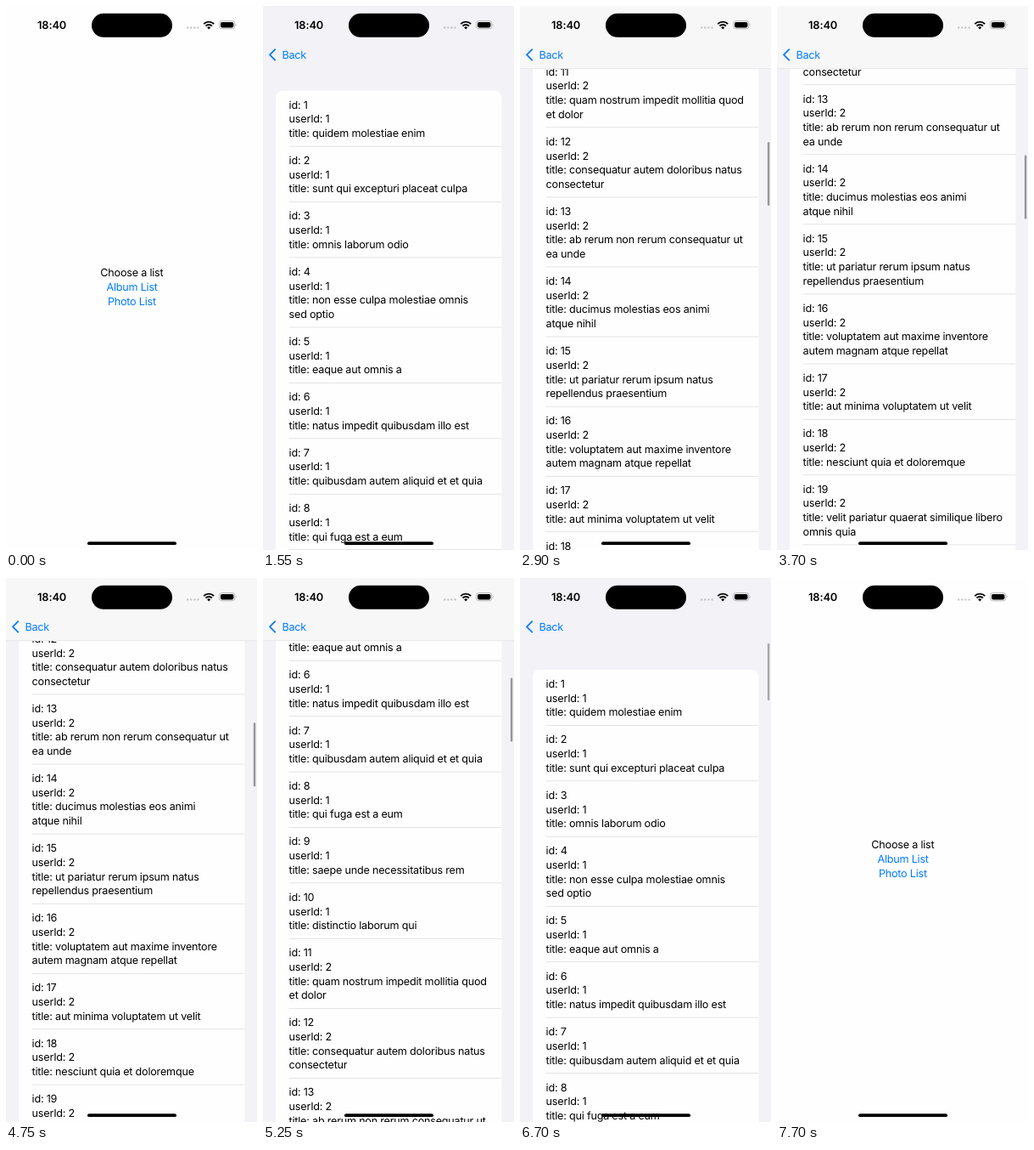
Animation, 296 px wide and 640 px high, one loop 8 s. Source, as an HTML page:

```html
<!DOCTYPE html>
<html lang="en">
<head>
<meta charset="utf-8">
<title>Album list</title>
<style>
  html, body { margin: 0; width: 100%; height: 100%; overflow: hidden; background: #fefefe; }
  svg { display: block; width: 100vw; height: 100vh; }
  text { font: 12.6px Inter, "Open Sans", sans-serif; letter-spacing: -.205px; fill: #000;
         text-rendering: geometricPrecision; white-space: pre; }
  .link { fill: #007aff; }
  .mid { text-anchor: middle; }
</style>
</head>
<body>
<svg viewBox="0 0 296 640" preserveAspectRatio="none">
  <defs>
    <linearGradient id="edge">
      <stop offset="0" stop-color="#000" stop-opacity="0"/>
      <stop offset="1" stop-color="#000" stop-opacity=".07"/>
    </linearGradient>
  </defs>
  <g id="home">
    <rect width="296" height="640" fill="#fefefe"/>
    <text class="mid" x="148.4" y="318">Choose a list</text>
    <text class="mid link" id="album" x="148.6" y="334.7">Album List</text>
    <text class="mid link" x="148.4" y="351.5">Photo List</text>
    <rect id="dim" width="296" height="640" fill="#000"/>
  </g>
  <g id="page">
    <rect x="-8" width="8" height="640" fill="url(#edge)"/>
    <rect width="296" height="640" fill="#f2f2f7"/>
    <g id="list"></g>
    <g id="header">
      <rect width="296" height="74" fill="#f7f7f8"/>
      <rect y="73.6" width="296" height=".5" fill="#d4d4d6"/>
    </g>
    <rect id="bar" x="291.9" width="2.4" rx="1.2" fill="#000" fill-opacity=".38"/>
  </g>
  <g id="back">
    <path d="M14.2 51.2 L8 57.4 L14.2 63.6" fill="none" stroke="#007aff" stroke-width="1.8"
          stroke-linecap="round" stroke-linejoin="round"/>
    <text class="link" id="backText" y="62">Back</text>
  </g>
  <g id="status">
    <text x="37" y="27" style="font-weight:600;font-size:12.8px;letter-spacing:-.1px">18:40</text>
    <rect x="101" y="8.8" width="95" height="28" rx="14"/>
    <path d="M214.2 25.4h13" stroke="#c4c4c6" stroke-width="2.4" stroke-linecap="round" stroke-dasharray="0 4.1"/>
    <g fill="none" stroke="#000" stroke-width="1.9">
      <path d="M233.2 21.1a8.4 8.4 0 0 1 12 0"/>
      <path d="M235.5 23.5a5.2 5.2 0 0 1 7.4 0"/>
    </g>
    <path d="M237.2 25.2a2.9 2.9 0 0 1 4 0l-2 2.2z"/>
    <rect x="251.6" y="17.6" width="18.2" height="9.2" rx="2.9" fill="none" stroke="#a6a6a8" stroke-width=".8"/>
    <rect x="253" y="19" width="15.4" height="6.4" rx="1.8"/>
    <path d="M270.9 20.6q1.5 1.6 0 3.2z" fill="#a6a6a8"/>
    <rect x="96" y="630.2" width="105" height="3.9" rx="1.95"/>
  </g>
</svg>
<script>
const LOOP = 8000, STEP = 50;
const ROW = 65.4, LINE = 16.7, TOP = 100, BAR = 75;
const titles = `quidem molestiae enim
sunt qui excepturi placeat culpa
omnis laborum odio
non esse culpa molestiae omnis|sed optio
eaque aut omnis a
natus impedit quibusdam illo est
quibusdam autem aliquid et et quia
qui fuga est a eum
saepe unde necessitatibus rem
distinctio laborum qui
quam nostrum impedit mollitia quod|et dolor
consequatur autem doloribus natus|consectetur
ab rerum non rerum consequatur ut|ea unde
ducimus molestias eos animi|atque nihil
ut pariatur rerum ipsum natus|repellendus praesentium
voluptatem aut maxime inventore|autem magnam atque repellat
aut minima voluptatem ut velit
nesciunt quia et doloremque
velit pariatur quaerat similique libero|omnis quia
voluptas rerum iure ut enim
repudiandae voluptatem optio est|consequatur rem in temporibus et
et rem non provident vel ut
incidunt quisquam hic adipisci sequi`.split("\n");

// [time, list offset]
const track = [
  [1500, 0], [1550, .3], [1700, 70], [1850, 190], [2050, 295], [2300, 366], [2450, 390],
  [2550, 440], [2700, 580], [2900, 710], [3150, 800], [3450, 842], [3650, 842], [3700, 842.3],
  [3900, 858], [4150, 866], [4500, 866], [4750, 798], [4900, 640], [5100, 450], [5300, 320],
  [5500, 245], [5650, 245], [5800, 190], [5950, 73], [6050, 0], [6180, -46], [6290, -56],
  [6500, -27], [6700, -8], [6950, 0]
];

const $ = id => document.getElementById(id);
const clamp = v => Math.max(0, Math.min(1, v));
const ramp = (t, from, to) => clamp((t - from) / (to - from));
const move = (node, x, y) => node.setAttribute("transform", `translate(${x} ${y})`);
const fade = (node, v) => node.setAttribute("opacity", v);

function buildList() {
  let y = TOP, rows = "";
  titles.forEach((title, i) => {
    const lines = [`id: ${i + 1}`, `userId: ${Math.floor(i / 10) + 1}`, ...`title: ${title}`.split("|")];
    lines.forEach((s, k) => rows += `<text x="30.6" y="${y + 21 + k * LINE}">${s}</text>`);
    y += ROW + (lines.length - 3) * LINE;
    rows += `<rect x="30.6" y="${y - .4}" width="250.6" height=".8" fill="#dedee2"/>`;
  });
  $("list").innerHTML =
    `<rect x="15" y="${TOP}" width="266.4" height="${y - TOP}" rx="7.5" fill="#fefefe"/>` + rows;
}

// Monotone cubic through the track points
function slope(i) {
  if (i < 1 || i > track.length - 2) return 0;
  const [a, b, c] = track.slice(i - 1, i + 2);
  const l = (b[1] - a[1]) / (b[0] - a[0]), r = (c[1] - b[1]) / (c[0] - b[0]);
  return l * r > 0 ? 2 * l * r / (l + r) : 0;
}
function scrollAt(t) {
  const i = track.findIndex(p => p[0] > t) - 1;
  if (i < 0) return 0;
  const [t0, a] = track[i], [t1, b] = track[i + 1];
  const d = t1 - t0, u = (t - t0) / d, v = 1 - u;
  return a * v * v * (1 + 2 * u) + b * u * u * (3 - 2 * u)
    + d * u * v * (slope(i) * v - slope(i + 1) * u);
}

function spring(ms) {
  if (ms <= 0) return 0;
  if (ms >= 550) return 1;
  const x = ms * .014;
  return 1 - (1 + x) * Math.exp(-x);
}

function draw(t) {
  const shown = spring(t - 400) - spring(t - 6950);
  const offset = scrollAt(t);

  move($("home"), -89 * shown, 0);
  fade($("dim"), .1 * shown);
  move($("page"), 296 * (1 - shown), 0);
  $("page").style.display = shown > 0 ? "" : "none";
  fade($("album"), t >= 400 && t < 600 ? .4 : 1);

  move($("list"), 0, -offset);
  $("list").style.display = t >= 1100 ? "" : "none";
  fade($("header"), ramp(offset, 12, 30));

  fade($("back"), clamp(shown * 1.6 - .6));
  $("backText").setAttribute("x", 22.4 + 90 * (1 - shown));

  const first = ramp(t, 1550, 1650) * (1 - ramp(t, 3900, 4150));
  const second = ramp(t, 4500, 4600) * (1 - ramp(t, 6650, 6900));
  fade($("bar"), first + second);
  $("bar").setAttribute("y", 77 + .117 * Math.max(0, offset));
  $("bar").setAttribute("height", BAR + Math.min(0, offset));
}

function tick() {
  const t = performance.now() % LOOP;
  draw(Math.floor(t / STEP) * STEP);
  requestAnimationFrame(tick);
}

buildList();
tick();
</script>
</body>
</html>
```
